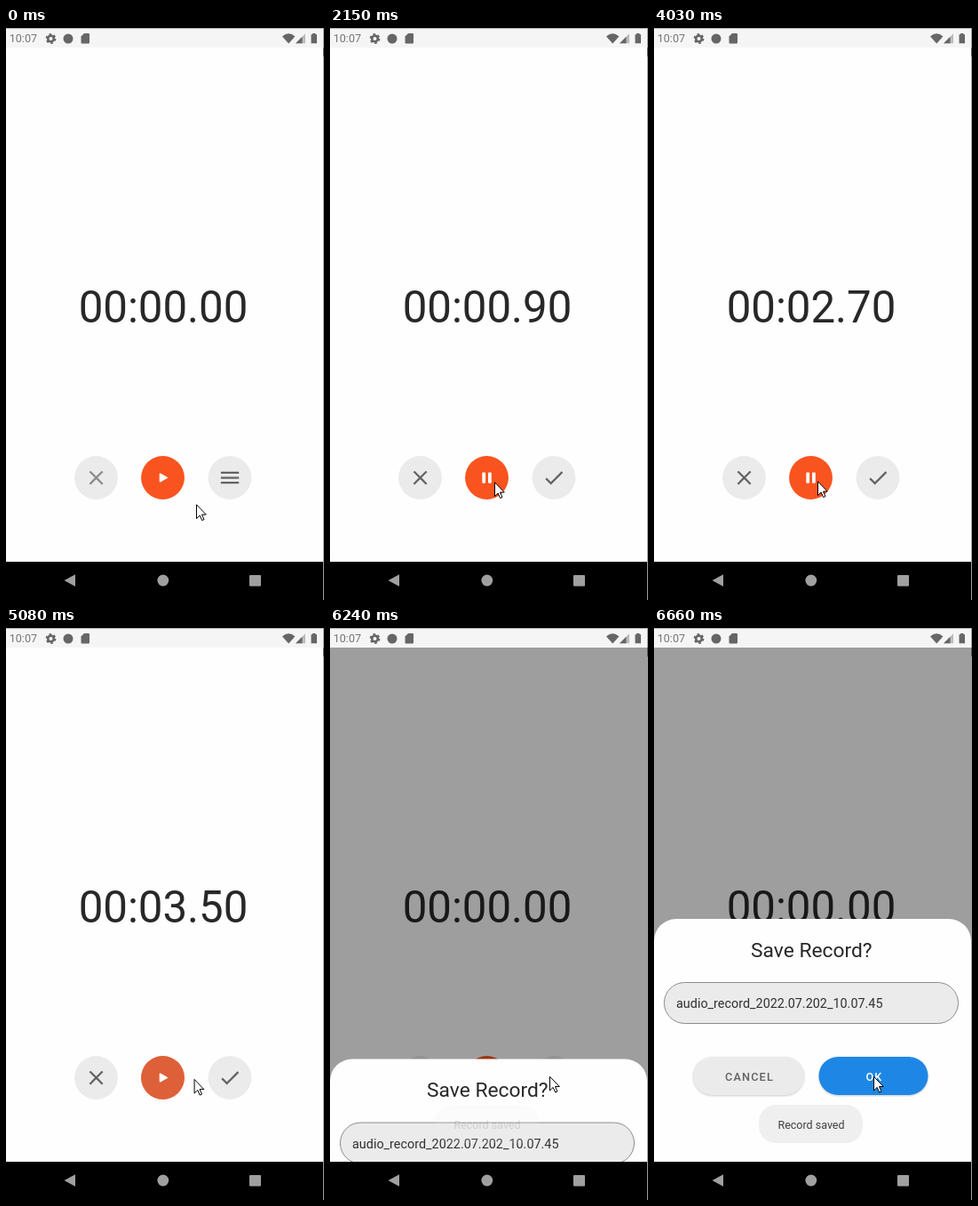
An HTML page for the animation above (8000 ms loop, 358 by 643 pixels).

```html
<!DOCTYPE html>
<html lang="en">
<head>
<meta charset="utf-8">
<title>Voice recorder</title>
<style>
  html, body { margin: 0; width: 100%; height: 100%; overflow: hidden; background: #fefefe; }
  svg { display: block; width: 358px; height: 643px; font-family: Roboto, sans-serif; }
  .mid { text-anchor: middle; }
  .caps { font-size: 12.7px; font-weight: 500; letter-spacing: 1.14px; }
  .raised { filter: drop-shadow(0 1.5px 1px rgba(0, 0, 0, .2)); }
</style>
</head>
<body>
<svg viewBox="0 0 358 643">
  <rect width="358" height="643" fill="#fefefe"/>

  <!-- main screen -->
  <text id="clock" class="mid" x="177" y="331" font-size="49.2" fill="#282828">00:00.00</text>
  <g fill="#ebebeb">
    <circle cx="101.5" cy="505.5" r="24.4"/>
    <circle cx="252" cy="505.5" r="24.4"/>
  </g>
  <circle cx="176.5" cy="505.5" r="24.4" fill="#f9541f"/>
  <circle id="pressed" cx="176.5" cy="505.5" r="24.4" fill="#c36d54"/>
  <path id="close" transform="translate(88 492) scale(1.13)"
    d="M19 6.41 17.59 5 12 10.59 6.41 5 5 6.41 10.59 12 5 17.59 6.41 19 12 13.41 17.59 19 19 17.59 13.41 12z"/>
  <g fill="#636363" transform="translate(238.5 492) scale(1.13)">
    <path id="menu" d="M3 18h18v-2H3zM3 13h18v-2H3zM3 6v2h18V6z"/>
    <path id="check" d="M9 16.17 4.83 12l-1.42 1.41L9 19 21 7l-1.41-1.41z"/>
  </g>
  <path id="play" d="M173.5 501.3 181 505.5 173.5 509.7z" fill="#fff" stroke="#fff" stroke-width="1.6" stroke-linejoin="round"/>
  <g id="pause" fill="#fff">
    <rect x="171.3" y="499.5" width="3.8" height="12.2" rx="1.3"/>
    <rect x="178" y="499.5" width="3.8" height="12.2" rx="1.3"/>
  </g>
  <rect id="dim" y="22" width="357" height="578"/>

  <!-- save sheet -->
  <g id="sheet">
    <rect width="357" height="340" rx="25" fill="#fefefe"/>
    <text class="mid" x="177.3" y="42.5" font-size="22.8" fill="#282828">Save Record?</text>
    <rect x="11.5" y="71.5" width="331" height="46" rx="23" fill="#ebebeb" stroke="#8c8c8c"/>
    <text x="25" y="100" font-size="14.4" fill="#303030">audio_record_2022.07.202_10.07.45</text>
    <rect class="raised" x="44" y="155" width="125" height="43" rx="21.5" fill="#ebebeb"/>
    <rect class="raised" x="185.5" y="155" width="123" height="43" rx="21.5" fill="#1e87e5"/>
    <text class="mid caps" x="107.5" y="181.5" fill="#636363">CANCEL</text>
    <text class="mid caps" x="248" y="181.5" fill="#fff">OK</text>
  </g>
  <g id="toast">
    <rect x="118" y="536" width="117" height="43" rx="19" fill="#efefef"/>
    <text class="mid" x="177" y="562.5" font-size="12.5" fill="#404040">Record saved</text>
  </g>

  <!-- status bar -->
  <rect width="358" height="22" fill="#f5f5f5"/>
  <rect width="358" height="1" fill="#b4b4b4"/>
  <text x="3.7" y="16.3" font-size="12.6" fill="#757575">10:07</text>
  <g fill="#666">
    <g fill="none" stroke="#666">
      <circle cx="50.5" cy="12" r="3.3" stroke-width="2.6"/>
      <circle cx="50.5" cy="12" r="4.9" stroke-width="2" stroke-dasharray="2.6 2.53"/>
    </g>
    <circle cx="70" cy="12" r="5.5"/>
    <path d="M88 6h5q1 0 1 1v9.5q0 1-1 1h-7.5q-1 0-1-1V9.5z"/>
    <path d="M311 9.5Q318.2 3 325.4 9.5L318.2 17.5z"/>
    <path d="M326 17.2 337 6.2V17.2z" opacity=".4"/>
    <path d="M326 17.2 333.5 9.7V17.2z"/>
    <path d="M345 6h3.5v1.2h1.5V17.2h-6.5V7.2H345z"/>
  </g>

  <!-- navigation bar -->
  <rect y="600" width="358" height="43"/>
  <g fill="#a0a0a0">
    <path d="M65.5 621 78 614.3V627.7z"/>
    <circle cx="176.8" cy="621" r="6.4"/>
    <rect x="274" y="615" width="13" height="12.5" rx="1"/>
  </g>
  <rect x="357" width="1" height="643" fill="#9b9b9b"/>
  <rect x="357" y="22" width="1" height="10" fill="#555"/>

  <path id="cursor" d="M.5.8V16.5L4.2 12.9 6.7 18.5 9 17.5 6.5 12H11.3z" fill="#fff" stroke="#000"/>
</svg>
<script>
  const LOOP = 8000;
  const STEP = 132; // the screen refreshes in steps of this many ms

  // Moments, counted in steps
  const START = 10, STOP = 36, RELEASE = 37, SAVE = 46;

  // Pointer moves: first step, last step, destination
  const HOME = { x: 214, y: 535 };
  const moves = [
    { from: 1, to: 7, x: 185, y: 510 },
    { from: 17, to: 20, x: 180, y: 508.5 },
    { from: 23, to: 26, x: 184, y: 509 },
    { from: RELEASE, to: 41, x: 247, y: 503.5 }
  ];

  const clamp = v => Math.min(1, Math.max(0, v));
  const easeOut = p => 1 - (1 - p) ** 2;
  const smooth = p => p * p * (3 - 2 * p);
  const progress = (n, from, length) => clamp((n - from) / length);

  const $ = id => document.getElementById(id);
  const set = (id, name, value) => $(id).setAttribute(name, value);
  const show = (id, on) => set(id, 'visibility', on ? 'visible' : 'hidden');

  function pointer(n) {
    return moves.reduce((pos, m) => {
      const p = easeOut(progress(n, m.from, m.to - m.from));
      return { x: pos.x + (m.x - pos.x) * p, y: pos.y + (m.y - pos.y) * p };
    }, HOME);
  }

  function reading(n) {
    const counting = n > START && n < SAVE;
    const tenths = counting ? Math.floor((Math.min(n, STOP) * STEP - 1200) / 100) : 0;
    return `00:0${Math.floor(tenths / 10)}.${tenths % 10}0`;
  }

  // Tint that fades out over two steps after a press
  const tint = (n, press) => n < press ? 0 : 1 - progress(n, press, 2);

  function draw(t) {
    const n = Math.floor(t / STEP);
    const running = n >= START && n < STOP;
    const active = n >= START && n < SAVE;
    const { x, y } = pointer(n);

    $('clock').textContent = reading(n);
    set('pressed', 'opacity', tint(n, START) + tint(n, RELEASE) - (n >= RELEASE ? tint(n, START) : 0));
    set('close', 'fill', active ? '#636363' : '#8a8a8a');
    show('menu', !active);
    show('check', active);
    show('play', !running);
    show('pause', running);
    set('dim', 'opacity', .38 * progress(n, SAVE - 1, 2));
    set('sheet', 'transform', `translate(0 ${600 - 273 * smooth(progress(n, SAVE, 2.23))})`);
    show('sheet', n >= SAVE);
    set('toast', 'opacity', smooth(progress(n, SAVE, 4)));
    set('cursor', 'transform', `translate(${x} ${y})`);
  }

  const origin = performance.now();
  function tick() {
    draw((performance.now() - origin) % LOOP);
    requestAnimationFrame(tick);
  }
  tick();
</script>
</body>
</html>
```
